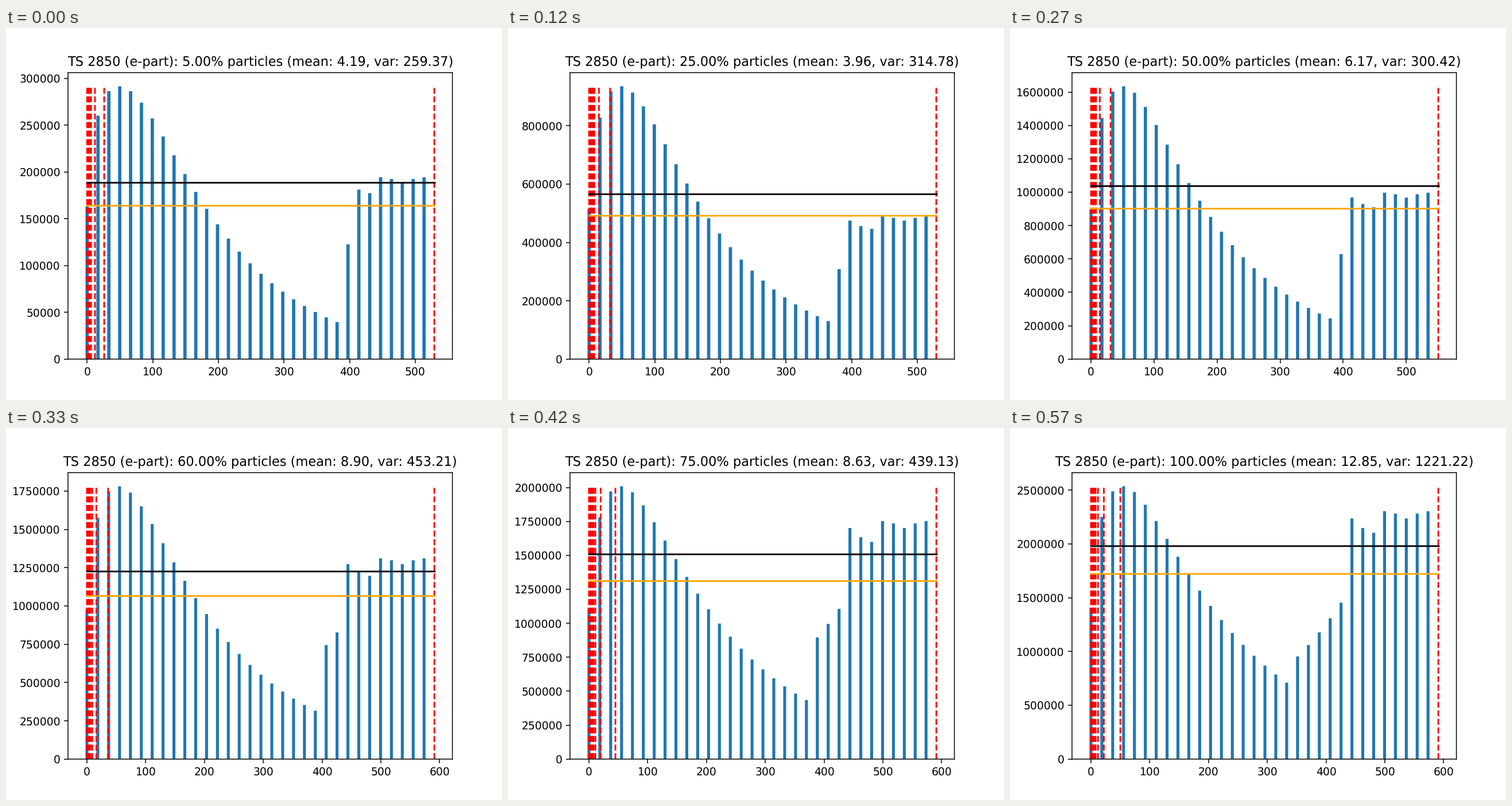
A matplotlib script that plays this animation: 864 by 648 pixels, repeating every 600 ms.

```python
import matplotlib.pyplot as plt
import numpy as np
from matplotlib.animation import FuncAnimation

plt.rcParams.update({
    "font.family": "DejaVu Sans",
    "text.hinting": "no_hinting",
    "path.snap": False,
    "savefig.dpi": "figure",
})

N_FRAMES = 20
N_BINS = 32
BAR_WIDTH = 5
MEAN_STEP = 81930   # growth of the mean load per 5% of particles
TOLERANCE = 1.15    # black limit relative to the mean load

# Key points over the loop
STEPS = [0, 2, 6, 9, 12, 16, 19]
PEAK = [291500, 603200, 1268000, 1634400, 1854600, 2162500, 2534700]
MEAN = [4.19, 4.42, 3.51, 6.17, 10.26, 7.01, 12.85]
VAR = [259.37, 346.19, 283.37, 300.42, 529.60, 348.66, 1221.22]

PLATEAU = 24        # first bin of the right-hand plateau
WOBBLE = [1.00, 0.96, 0.94, 1.03, 1.02, 1.00, 1.02, 1.03]

bins = np.arange(N_BINS)


def decay(i):
    """Fast rise, then a hyperbolic bend into exponential decay."""
    slope = np.interp(i, [6, 16], [0.124, 0.1035])
    bend = 11 + 11 * np.exp(-i / 3)
    fall = np.sqrt((bins - 2.7) ** 2 + bend) - np.sqrt(bend)
    shape = (1 - 0.39 * 0.2 ** bins) * np.exp(-slope * fall)
    return np.interp(i, STEPS, PEAK) * shape / shape.max()


def histogram(i, mean_load):
    """Decay on the left; the right side fills up to the mean load."""
    counts = decay(i)
    start = int(np.round(np.interp(i, [0, 2, 9, 19], [24, 23, 23, 19])))
    edge = max(PLATEAU - 1, start)
    ramp = np.where(bins > edge, 1, 0.65 * 0.9 ** (edge - bins))
    ramp[PLATEAU:] *= WOBBLE
    missing = N_BINS * mean_load - counts[:start].sum()
    counts[start:] = missing * ramp[start:] / ramp[start:].sum()
    return counts


def splits(i, last):
    """A dense group near zero, a few wider gaps and the far end."""
    far = np.interp(i, [0, 2, 9, 16], [26, 33, 31, 50])
    outer = np.round(far * np.array([0.25, 0.45, 1]))
    return [*np.arange(0, far / 5, 2), *outer, last - 1]


fig, ax = plt.subplots(figsize=(6.4, 4.8), dpi=135)


def draw(i):
    last = (530, 552, 592)[np.digitize(i, (8, 11))]
    mean_load = MEAN_STEP * (i + 2)
    counts = histogram(i, mean_load)

    ax.clear()
    ax.bar(bins * last / N_BINS, counts, width=BAR_WIDTH)
    for x in splits(i, last):
        ax.plot([x, x], [0, counts.max()], "--", color="red")
    for level, color in ((1, "orange"), (TOLERANCE, "black")):
        ax.plot([0, last], [mean_load * level] * 2, color=color)
    ax.ticklabel_format(style="plain", axis="y")

    mean, var = (np.interp(i, STEPS, v) for v in (MEAN, VAR))
    ax.set_title(f"TS 2850 (e-part): {5 * (i + 1):.2f}% particles "
                 f"(mean: {mean:.2f}, var: {var:.2f})")
    return ax.get_children()


anim = FuncAnimation(fig, draw, frames=N_FRAMES, interval=30,
                     repeat=True, repeat_delay=0, blit=False)
plt.show()
```
